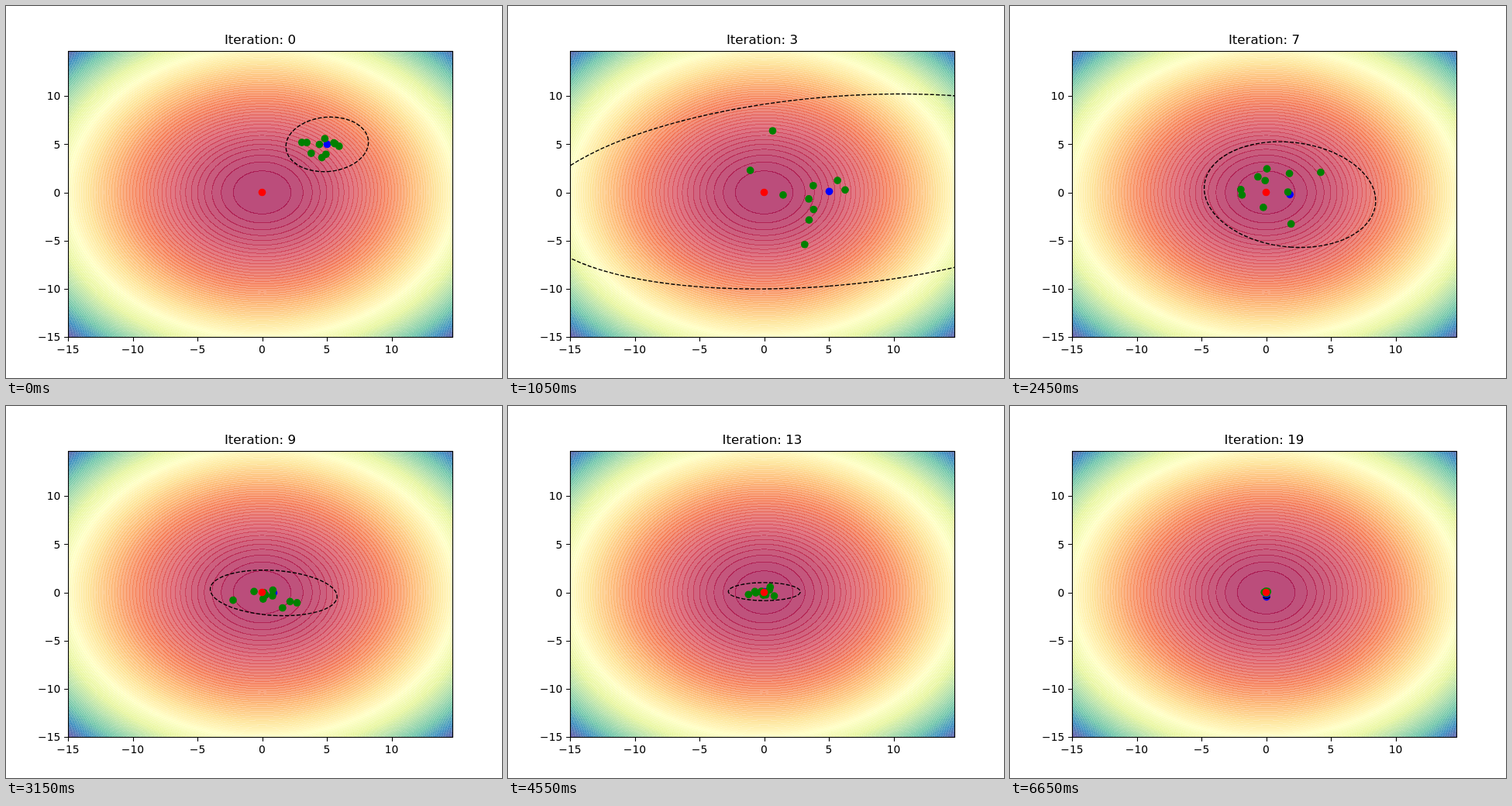
Animation of 640x480 px, one loop 7 s. Source, as an HTML page with a canvas:

```html
<!DOCTYPE html>
<html lang="en">
<head>
<meta charset="utf-8">
<title>Evolution strategy</title>
<style>
  html, body { margin: 0; width: 100%; height: 100%; overflow: hidden; background: #fff; }
  canvas, svg { position: absolute; left: 0; top: 0; width: 640px; height: 480px; display: block; }
  text { font: 13.89px "DejaVu Sans", sans-serif; fill: #000; }
  #title { font-size: 16.67px; }
</style>
</head>
<body>
<canvas id="field" width="640" height="480"></canvas>
<svg viewBox="0 0 640 480">
  <clipPath id="box"><rect x="80" y="57.6" width="496" height="369.6"/></clipPath>
  <g clip-path="url(#box)">
    <circle id="mean" r="4.86" fill="#00f"/>
    <path id="ring" fill="none" stroke="#000" stroke-width="1.39" stroke-dasharray="5.14 2.22"/>
    <g id="dots" fill="#008000"></g>
    <circle cx="330.5" cy="240.5" r="4.86" fill="#f00"/>
  </g>
  <g id="axes" stroke="#000" stroke-width="1.11" fill="none">
    <rect x="80.5" y="58.5" width="496" height="369"/>
  </g>
  <g id="labels"></g>
  <text id="title" x="328" y="49" text-anchor="middle"></text>
</svg>
<script>
const STEP = 350, COUNT = 20;
const LEFT = 80, BOTTOM = 427.2;
const SX = 496 / 29.7, SY = 369.6 / 29.7;
const GOAL = { x: 330.5, y: 240.5 };
const $ = id => document.getElementById(id);

function add(parent, tag, attrs, text) {
  const el = document.createElementNS("http://www.w3.org/2000/svg", tag);
  for (const k in attrs) el.setAttribute(k, attrs[k]);
  if (text) el.textContent = text;
  parent.appendChild(el);
}

// Spectral colour scale, t in 0..1
const SPECTRAL = ["9e0142", "d53e4f", "f46d43", "fdae61", "fee08b", "ffffbf",
  "e6f598", "abdda4", "66c2a5", "3288bd", "5e4fa2"]
  .map(h => [0, 2, 4].map(i => parseInt(h.slice(i, i + 2), 16)));

function spectral(t) {
  const i = Math.min(9, Math.floor(t * 10)), f = t * 10 - i;
  return SPECTRAL[i].map((c, k) => c + (SPECTRAL[i + 1][k] - c) * f);
}

// Square of v, interpolated linearly on a 0.3 grid
function square(v) {
  const s = (v + 15) / 0.3, t = s - Math.floor(s);
  return v * v + t * (1 - t) * 0.09;
}

function span(a, b) {
  const p = square(a), q = square(b);
  return [a * b < 0 ? 0 : Math.min(p, q), Math.max(p, q)];
}

// Translucent bands of x² + y²; a pixel on a border is painted by both bands
function drawField() {
  const ctx = $("field").getContext("2d");
  const w = 496, h = 370, y0 = 58, inset = 0.03;
  const img = ctx.createImageData(w, h);
  const bands = Array.from({ length: 90 }, (_, k) => spectral(k / 89));
  const cols = Array.from({ length: w }, (_, i) =>
    span((i + inset) / SX - 15, (i + 1 - inset) / SX - 15));
  for (let j = 0; j < h; j++) {
    const row = span((BOTTOM - y0 - j - inset) / SY - 15,
                     (BOTTOM - y0 - j - 1 + inset) / SY - 15);
    for (let i = 0; i < w; i++) {
      const first = Math.floor((cols[i][0] + row[0]) / 5);
      const last = Math.min(89, Math.floor((cols[i][1] + row[1]) / 5));
      let r = 255, g = 255, b = 255;
      for (let k = Math.min(first, 89); k <= last; k++) {
        const c = bands[k];
        r += (c[0] - r) * 0.7;
        g += (c[1] - g) * 0.7;
        b += (c[2] - b) * 0.7;
      }
      img.data.set([r, g, b, 255], (j * w + i) * 4);
    }
  }
  ctx.putImageData(img, LEFT, y0);
}

function drawAxes() {
  for (let v = -15; v <= 10; v += 5) {
    const x = LEFT + (v + 15) * SX, y = BOTTOM - (v + 15) * SY;
    const tx = Math.round(x) + 0.5, ty = Math.round(y) + 0.5;
    const name = String(v).replace("-", "\u2212");
    add($("axes"), "path", { d: `M${tx} 428v4.86M80 ${ty}h-4.86` });
    add($("labels"), "text", { x, y: 448, "text-anchor": "middle" }, name);
    add($("labels"), "text", { x: 70.3, y: Math.round(y + 5.2), "text-anchor": "end" }, name);
  }
}

// Key states of the search: centre, half width and height, correlation
const KEYS = [
  { n: 0, x: 414.4, y: 178.5, w: 53.2, h: 35.2, rho: .08 },
  { n: 3, x: 414.5, y: 239.3, w: 383, h: 125.8, rho: .24 },
  { n: 5, x: 397, y: 240.3, w: 170.3, h: 77.3, rho: -.13 },
  { n: 6, x: 380, y: 242, w: 330, h: 200, rho: -.13 },
  { n: 7, x: 361.2, y: 243.3, w: 110.6, h: 68.2, rho: -.12 },
  { n: 11, x: 329.5, y: 239, w: 60.5, h: 12.7, rho: -.2 },
  { n: 15, x: 332, y: 240, w: 35.6, h: 10.6, rho: .18 },
  { n: 19, x: 331, y: 246.3, w: 4, h: 2, rho: 0 }
];

// Centres move linearly, sizes change geometrically
function stateAt(n) {
  const i = Math.max(1, KEYS.findIndex(k => k.n >= n));
  const a = KEYS[i - 1], b = KEYS[i], t = (n - a.n) / (b.n - a.n);
  const mix = k => a[k] + (b[k] - a[k]) * t;
  const scale = k => a[k] * (b[k] / a[k]) ** t;
  return { x: mix("x"), y: mix("y"), w: scale("w"), h: scale("h"), rho: mix("rho") };
}

// Random population, drawn ever closer to the goal
function population(n, s) {
  let seed = n * 7919 + 17;
  const rand = () => (seed = seed * 16807 % 2147483647) / 2147483647;
  const bell = () => (rand() + rand() + rand() + rand() - 2) * 1.7;
  rand();
  const pull = n / (COUNT - 1);
  const dx = Math.min(s.w * 0.26, 42), dy = Math.min(s.h * 0.35, 50);
  return Array.from({ length: 10 }, () => ({
    cx: s.x + (GOAL.x - s.x) * pull + bell() * dx,
    cy: s.y + (GOAL.y - s.y) * pull + bell() * dy
  }));
}

function ringPath({ x, y, w, h, rho }) {
  const tilt = Math.asin(rho), pts = [];
  for (let i = 0; i < 160; i++) {
    const a = i / 80 * Math.PI - Math.PI / 2;
    pts.push((x + w * Math.cos(a)).toFixed(2) + " " + (y - h * Math.sin(a + tilt)).toFixed(2));
  }
  return "M" + pts.join("L") + "Z";
}

function show(n) {
  const s = stateAt(n);
  $("title").textContent = "Iteration: " + n;
  $("mean").setAttribute("cx", s.x);
  $("mean").setAttribute("cy", s.y);
  $("ring").setAttribute("d", ringPath(s));
  $("dots").replaceChildren();
  for (const p of population(n, s)) add($("dots"), "circle", { ...p, r: 4.86 });
}

drawField();
drawAxes();
show(0);

const start = performance.now();
let shown = 0;
function tick() {
  const n = Math.floor((performance.now() - start) / STEP) % COUNT;
  if (n !== shown) show(shown = n);
  requestAnimationFrame(tick);
}
requestAnimationFrame(tick);
</script>
</body>
</html>
```
